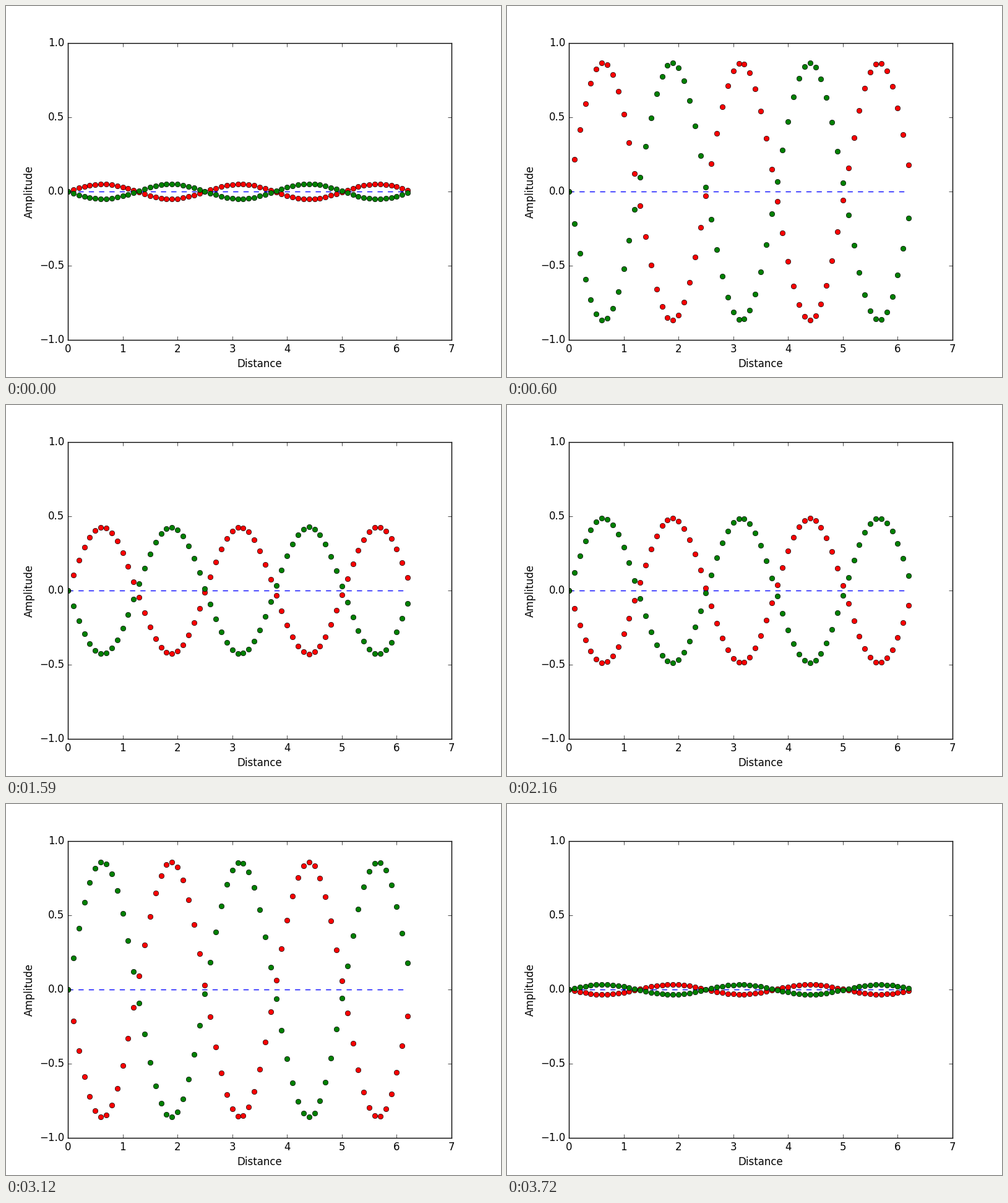
Write a matplotlib script that moves like this. It is 800x600 px and loops after 3750 ms.

```python
import numpy as np
import matplotlib.pyplot as plt
from matplotlib.animation import FuncAnimation

STEP = 0.05      # phase advance per frame
FRAMES = 125
INTERVAL = 30    # ms

plt.style.use("classic")
plt.rcParams["font.family"] = "DejaVu Sans"

fig = plt.figure(figsize=(8, 6), dpi=100, facecolor="white")
ax = fig.add_axes([0.125, 0.1, 0.775, 0.8])
ax.set_xlim(0, 7)
ax.set_ylim(-1, 1)
ax.set_xticks(range(8))
ax.set_yticks([-1, -0.5, 0, 0.5, 1])
ax.set_xlabel("Distance")
ax.set_ylabel("Amplitude")

x = np.arange(0, 2 * np.pi, 0.1)
shape = np.sin(2.5 * x)

ax.plot(x, 0 * x, "b--")
red, = ax.plot(x, 0 * x, "ro")
green, = ax.plot(x, 0 * x, "go")


def update(i):
    y = shape * np.sin(STEP * (i + 1))
    red.set_ydata(y)
    green.set_ydata(-y)
    return red, green


update(0)
anim = FuncAnimation(fig, update, frames=FRAMES, interval=INTERVAL,
                     repeat=True, repeat_delay=0, blit=False)
plt.show()
```
